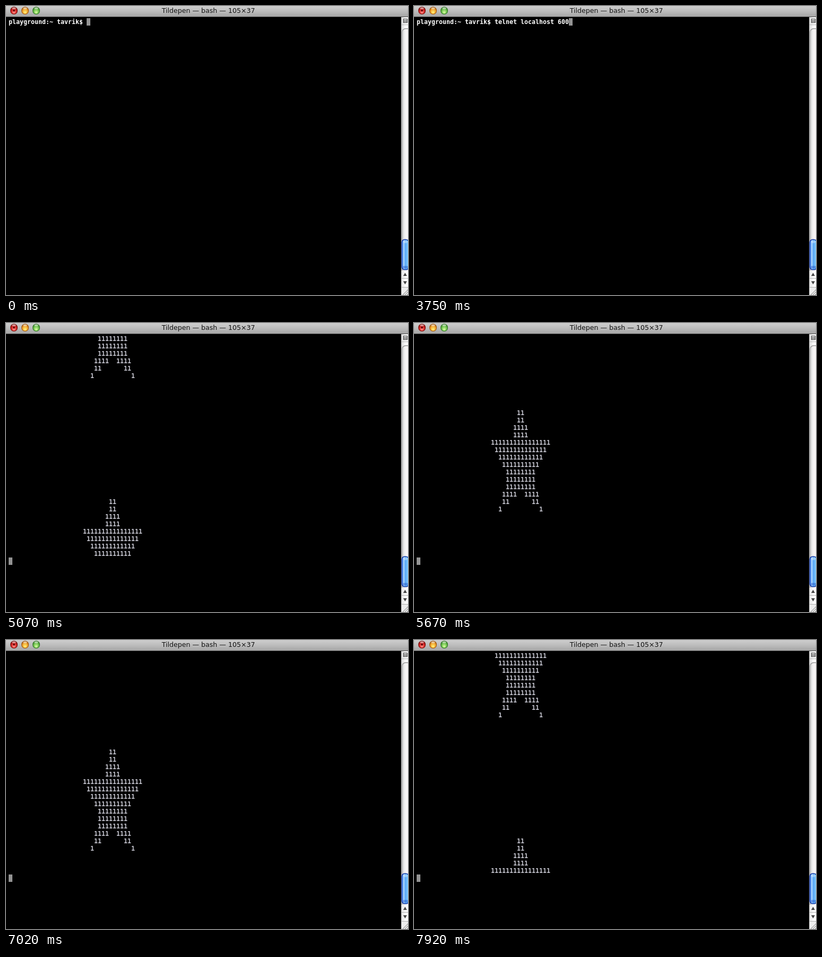
An HTML page with a canvas for the animation above (8000 ms loop, 758x546 px).

```html
<!DOCTYPE html>
<html lang="en">
<head>
<meta charset="utf-8">
<title>Scrolling star</title>
<style>
  html, body { margin: 0; width: 100%; height: 100%; overflow: hidden; background: #000; }
  canvas, pre, #cursor, #title { position: absolute; left: 0; top: 0; margin: 0; }
  #title {
    left: auto; right: calc(100% - 469.5px); top: 0; white-space: pre;
    font: 12.6px/18px "DejaVu Sans", sans-serif; color: #111;
  }
  #screen {
    left: 5px; top: 23px; color: #fff;
    font: bold 11.63px/14px "DejaVu Sans Mono", monospace;
  }
  #cursor { width: 7px; height: 14px; background: #939393; }
</style>
</head>
<body>
<canvas id="frame" width="758" height="546"></canvas>
<div id="title">Tildepen — bash — 105×37</div>
<div id="cursor"></div>
<pre id="screen"></pre>
<script>
const LOOP = 8000, STEP = 150, ROWS = 30, CENTER = 28;
const PROMPT = "playground:~ tavrik$ ";
const COMMAND = "telnet localhost 60000";
// [time, characters typed so far]
const KEYS = [
  [450, 1], [750, 2], [900, 3], [1350, 4], [1500, 5], [1650, 7],
  [2100, 8], [2250, 9], [2400, 11], [2550, 12], [2700, 14], [2850, 15], [3000, 17],
  [3300, 18], [3450, 19], [3750, 20], [3900, 21], [4050, 22]
];
const ENTER = 4200, STAR = 4350, SPIN = 4770;

const ones = n => "1".repeat(n);
const legs = (foot, gap) => ones(foot) + " ".repeat(gap) + ones(foot);
const star = [
  ...[2, 2, 4, 4, 16, 14, 12, 10, 8, 8, 8].map(ones),
  legs(4, 2), legs(2, 6), legs(1, 10)
].map(s => " ".repeat(CENTER - s.length / 2) + s);

const screen = document.getElementById("screen");
const cursor = document.getElementById("cursor");
const g = document.getElementById("frame").getContext("2d");

function rect(x, y, w, h, fill) {
  g.fillStyle = fill;
  g.fillRect(x, y, w, h);
}

function ramp(x0, y0, x1, y1, ...colors) {
  const r = g.createLinearGradient(x0, y0, x1, y1);
  colors.forEach((c, i) => r.addColorStop(i / (colors.length - 1), c));
  return r;
}

function pill(x, y, w, h, r, fill) {
  g.beginPath();
  g.roundRect(x, y, w, h, r);
  g.fillStyle = fill;
  g.fill();
}

function light(x, rim, body, glow) {
  const y = 8.5;
  pill(x - 7, y - 7, 14, 14.5, 7, rim);
  const r = g.createRadialGradient(x, y + 4, 0.5, x, y + 1, 7);
  r.addColorStop(0, glow);
  r.addColorStop(0.65, body);
  r.addColorStop(1, rim);
  pill(x - 6, y - 6, 12, 12.5, 6, r);
  g.beginPath();
  g.ellipse(x, y - 3.8, 3.6, 2, 0, 0, 7);
  g.fillStyle = ramp(0, 2, 0, 7, "rgba(255,255,255,.9)", "rgba(255,255,255,.15)");
  g.fill();
}

function arrow(y, dir) {
  g.beginPath();
  g.moveTo(749, y + 3 * dir);
  g.lineTo(756, y + 3 * dir);
  g.lineTo(752.5, y - 3 * dir);
  g.fillStyle = "#444";
  g.fill();
}

function drawTitleBar() {
  rect(0, 0, 758, 20, ramp(0, 0, 0, 20, "#cecece", "#bcbcbc", "#a5a5a5"));
  rect(0, 20, 758, 1, "#494949");
  light(15, "#7c1512", "#d8201f", "#ff9088");
  light(36, "#a35a10", "#f3a52c", "#fff37a");
  light(57, "#357a28", "#6abf4b", "#d6ff9e");
  g.beginPath();
  g.arc(15, 8.5, 2, 0, 7);
  g.fillStyle = "#62090a";
  g.fill();
}

function drawScrollBar() {
  rect(745, 21, 13, 525, ramp(745, 0, 758, 0, "#d5d5d5", "#f4f4f4", "#fff"));
  rect(745, 21, 1, 525, "#bdbdbd");

  rect(749, 24, 8, 8, "#444");
  rect(750, 25, 6, 6, "#ddd");
  rect(750, 27, 6, 1, "#555");
  rect(750, 29, 6, 1, "#555");
  rect(745, 35, 13, 1, "#b5b5b5");

  pill(746, 42, 18, 470, [8, 8, 0, 0], "#999");
  pill(747, 43.5, 17, 468, [7, 7, 0, 0],
    ramp(747, 0, 758, 0, "#c4c4c4", "#ececec", "#f7f5f5", "#f7f5f5"));

  pill(745.5, 440.5, 14.5, 58.5, 6, "#1b3fa8");
  pill(747, 442, 12, 55.5, 5,
    ramp(747, 0, 759, 0, "#2f6fe0", "#b4dcff", "#55a5f5", "#6fbcfb", "#9fe0ff"));
  pill(749, 443, 8, 5, 3, "rgba(255,255,255,.35)");
  pill(748, 491, 10, 5, 4, "rgba(25,70,190,.4)");

  rect(746, 500, 12, 46, ramp(746, 0, 758, 0, "#e6e6e6", "#f8f8f8", "#fff"));
  rect(746, 514, 12, 1, "#b0b0b0");
  rect(746, 531, 12, 1, "#b0b0b0");
  arrow(507, 1);
  arrow(523, -1);

  rect(746, 532, 12, 14, "#ededed");
  g.strokeStyle = "#777";
  g.lineWidth = 1;
  g.beginPath();
  for (const d of [0, 4, 8]) {
    g.moveTo(748 + d, 546);
    g.lineTo(758, 536 + d);
  }
  g.stroke();
}

function starText(t) {
  const step = Math.floor((t - SPIN) / STEP);
  const turn = t < SPIN ? (t < STAR + STEP ? -2 : -1) : step;
  const top = ROWS - 2 - 3 * turn;
  const lines = Array(ROWS).fill("");
  star.forEach((s, i) => {
    lines[(((top + i) % ROWS) + ROWS) % ROWS] = s;
  });
  return lines.join("\n");
}

function show(text, col, row, color) {
  if (screen.textContent !== text) screen.textContent = text;
  screen.style.color = color;
  cursor.style.left = 5 + 7 * col + "px";
  cursor.style.top = 23 + 14 * row + "px";
}

function render(t) {
  if (t >= STAR) return show(starText(t), 0, ROWS, "#cacad4");
  const typed = KEYS.reduce((n, [at, count]) => (t >= at ? count : n), 0);
  const line = PROMPT + COMMAND.slice(0, typed);
  if (t >= ENTER) show(line, 0, 1, "#fff");
  else show(line, line.length, 0, "#fff");
}

rect(0, 0, 758, 546, "#000");
drawTitleBar();
drawScrollBar();

const start = performance.now();
function tick() {
  render((performance.now() - start) % LOOP);
  requestAnimationFrame(tick);
}
tick();
</script>
</body>
</html>
```
